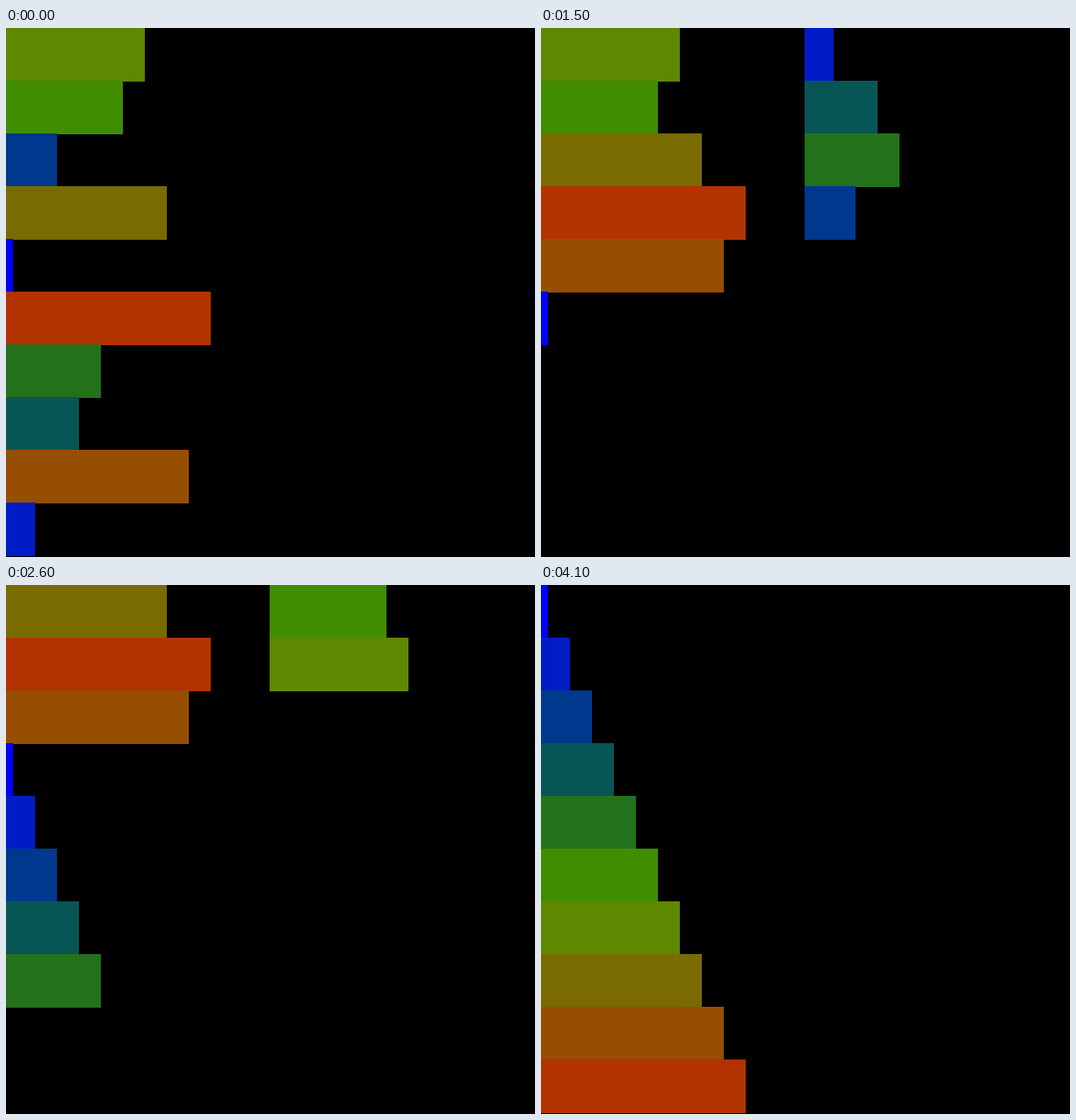
A matplotlib script that plays this animation: 602x602 px, repeating every 4.2 s.

```python
import matplotlib.pyplot as plt
from matplotlib.animation import FuncAnimation
from matplotlib.patches import Rectangle

SIZE, ROW, B_LEFT = 602, 60, 300
START = [6, 5, 2, 7, 0, 9, 4, 3, 8, 1]
COUNT = len(START)


def color(rank):
    t = rank / (COUNT - 1)
    rgb = (t - 0.3, min(t, 1.2 - t), 1 - 2 * t)
    return tuple(int(max(0, c) * 255 + 1e-6) / 255 for c in rgb)


def sort_states(start):
    """Two-stack sort: every state after each single push or rotation."""
    a, b = list(start), []
    states = [(tuple(a), ())]

    def record():
        states.append((tuple(a), tuple(b)))

    def push(src, dst):
        dst.insert(0, src.pop(0))
        record()

    def rotate(stack, reverse=False):
        if reverse:
            stack.insert(0, stack.pop())
        else:
            stack.append(stack.pop(0))
        record()

    def distance(value):
        i = b.index(value)
        return min(i, len(b) - i)

    def drain():
        # Smallest goes to the bottom of a, largest waits on top.
        waiting = 0
        while b:
            value = min(min(b), max(b), key=distance)
            smallest = value == min(b)
            reverse = b.index(value) > len(b) / 2
            while b[0] != value:
                rotate(b, reverse)
            push(b, a)
            if smallest:
                rotate(a)
            else:
                waiting += 1
        for _ in range(waiting):
            rotate(a)

    half = COUNT // 2
    for _ in range(COUNT):
        if a[0] < half:
            push(a, b)
        else:
            rotate(a)
    drain()
    for _ in range(half):
        push(a, b)
    drain()
    return states


states = sort_states(START)

fig = plt.figure(figsize=(7, 7), dpi=SIZE / 7, facecolor="black")
ax = fig.add_axes([0, 0, 1, 1])
ax.set_xlim(0, SIZE)
ax.set_ylim(SIZE, 0)
ax.axis("off")

bars = [
    ax.add_patch(Rectangle((0, 0), 8 + 25 * rank, ROW + 1, linewidth=0,
                           facecolor=color(rank), antialiased=False))
    for rank in range(COUNT)
]


def draw(frame):
    for left, stack in zip((0, B_LEFT), states[frame]):
        for row, rank in enumerate(stack):
            bars[rank].set_xy((left, row * ROW))
            bars[rank].set_zorder(row + 1)  # lower rows overlap by one pixel
    return bars


anim = FuncAnimation(fig, draw, frames=len(states), interval=100,
                     repeat=True, repeat_delay=0, blit=False)
plt.show()
```
